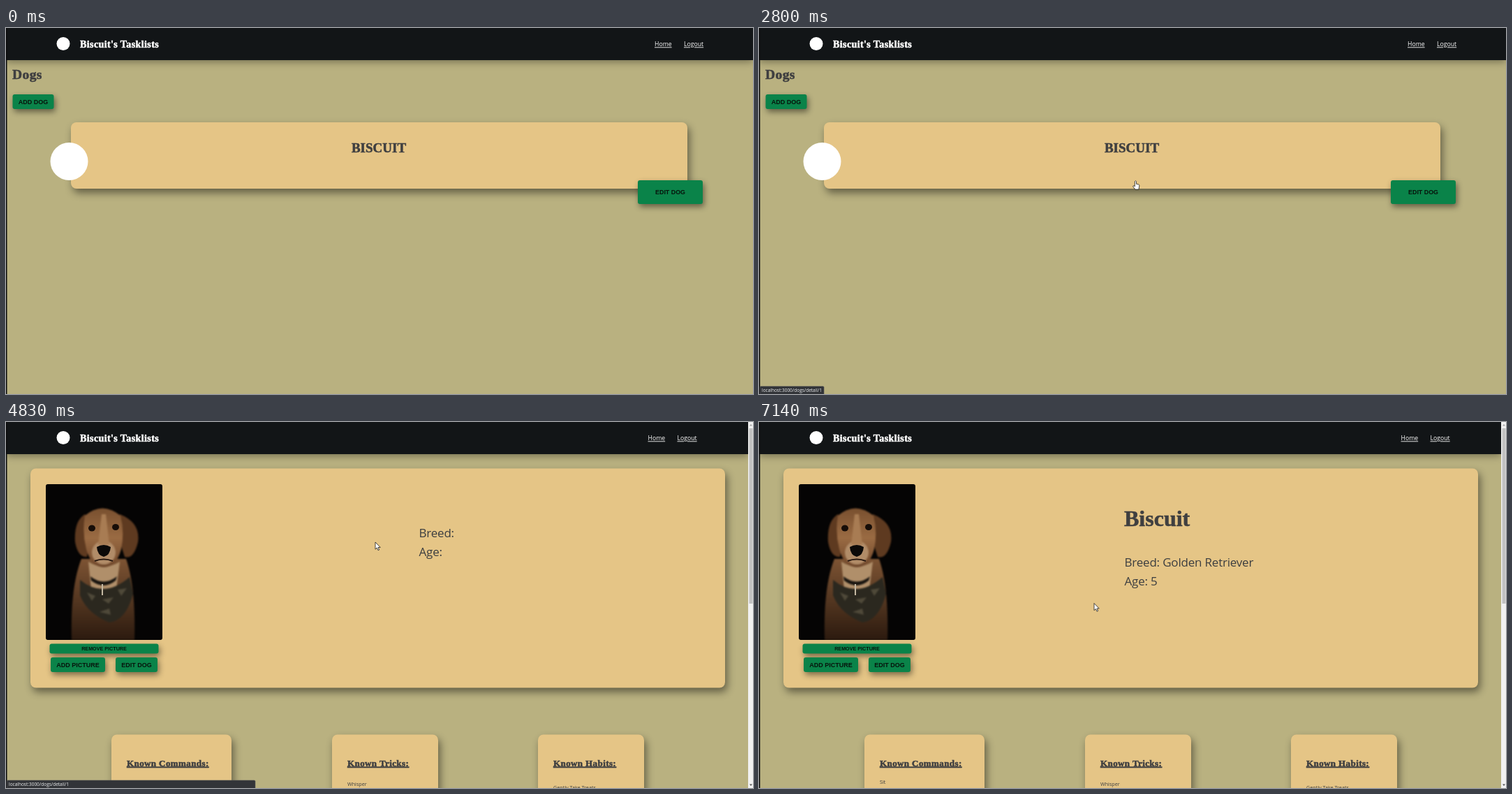
Write an HTML page that moves like this. It is 1070x524 px and loops after 8000 ms.

```html
<!DOCTYPE html>
<html lang="en">
<head>
<meta charset="utf-8">
<title>Dog checklist</title>
<style>
  html, body { margin: 0; width: 100%; height: 100%; overflow: hidden; background: #b9b180; }
  svg { display: block; width: 100vw; height: 100vh; }
  text { font-family: "Open Sans", "Noto Sans", sans-serif; fill: #3c3e40; white-space: pre; }
  .slab { font-family: "Liberation Serif", serif; font-weight: bold; fill: #3f3f40; stroke: #3f3f40; stroke-width: .55px; }
  .brand { fill: #fff; stroke: #fff; font-size: 14px; letter-spacing: .4px; }
  .page { font-size: 19.5px; letter-spacing: .4px; }
  .sub { font-size: 13px; letter-spacing: .4px; text-decoration: underline; }
  .nav { font-size: 8.7px; fill: #fff; text-decoration: underline; }
  .fact { font-size: 17px; letter-spacing: -.2px; }
  .item { font-size: 7.2px; }
  .label { font-family: "Liberation Sans", sans-serif; font-weight: bold; fill: #07140c; text-anchor: middle; }
  .card { fill: #e5c586; filter: drop-shadow(3px 6px 6px #0007); }
  .button { fill: #0a8349; filter: drop-shadow(2px 4px 4.5px #0007); }
  .bar { fill: #121517; filter: drop-shadow(0 2px 6px #0006); }
  .cursor { fill: #fff; stroke: #111; stroke-width: .75px; stroke-linejoin: round; }
  .soft { filter: blur(1.3px); }
</style>
</head>
<body>
<svg viewBox="0 0 1070 524" preserveAspectRatio="none">
  <defs>
    <clipPath id="frame"><rect x="57" y="89" width="167" height="223" rx="3"/></clipPath>
    <linearGradient id="fur" x1="0" y1="0" x2="0" y2="1">
      <stop offset="0" stop-color="#79502f"/><stop offset=".5" stop-color="#9a6b43"/><stop offset="1" stop-color="#6f472b"/>
    </linearGradient>
    <linearGradient id="chest" x1="0" y1="0" x2="0" y2="1">
      <stop offset="0" stop-color="#7d5433"/><stop offset="1" stop-color="#2c1a0f"/>
    </linearGradient>
  </defs>
  <rect width="1070" height="524" fill="#b9b180"/>
  <g id="list"></g>
  <g id="detail"></g>
  <rect width="1.5" height="524" fill="#0b0c0d"/>
  <g id="status">
    <rect id="statusBox" x="1" y="513" height="13" rx="1.5" fill="#323438" stroke="#55565a" stroke-width=".6"/>
    <text x="4" y="521.3" font-size="6.5" style="fill:#eceef0">localhost:3000/dogs/detail/1</text>
  </g>
  <circle id="click" cx="528" cy="174" r="6.2" fill="#e6da00" opacity=".75"/>
  <g id="pointer" class="cursor">
    <path id="arrow" d="M0 0V10.2L2.3 8.1 4 11.7 5.6 11 4 7.5H7.2Z"/>
    <path id="hand" d="M-1.1 1.2Q0-.7 1.1 1.2V4.8L4.4 5.5Q5.5 5.9 5.4 7.4L4.5 12.6H-.6L-3.7 8.6Q-3.6 6.9-2.3 7.3L-1.1 8.4Z"/>
  </g>
</svg>
<script>
const $ = id => document.getElementById(id);
const NAME = "Biscuit";

const text = (cls, x, y, s, extra = "") => `<text class="${cls}" x="${x}" y="${y}" ${extra}>${s}</text>`;
const box = (cls, x, y, w, h, r) => `<rect class="${cls}" x="${x}" y="${y}" width="${w}" height="${h}" rx="${r}"/>`;
const button = (x, y, w, h, s, size = 9) =>
  box("button", x, y, w, h, 3) + text("label", x + w / 2, y + h / 2 + size * .34, s, `font-size="${size}"`);
const header = (width, shift) =>
  box("bar", 0, 0, width, 46, 0) +
  `<circle cx="82" cy="22.5" r="9.5" fill="#fff"/>` +
  text("slab brand", 106, 27.5, NAME + "'s Tasklists") +
  text("nav", 929 - shift, 26.4, "Home") + text("nav", 971 - shift, 26.4, "Logout");
const column = (x, w, title, item, y) =>
  box("card", x, 447.5, w, 100, 8) + text("slab sub", x + 22, 492.7, title) + text("item", x + 22, y, item);

const photo = `<g clip-path="url(#frame)">
  <rect x="57" y="89" width="167" height="223" fill="#050404"/>
  <g class="soft">
    <path d="M108 196Q92 236 94 312H184Q186 236 172 196Z" fill="url(#chest)"/>
    <path d="M118 200Q140 214 163 200L158 240H122Z" fill="#b08f6a"/>
    <path d="M121 221Q140 236 159 221L157 227Q140 241 122 227Z" fill="#191510"/>
    <path d="M106 226Q140 254 177 222L182 246Q172 284 148 287Q116 274 106 248Z" fill="#2b281f"/>
    <path d="M116 244l12 5-5 7zM138 254l16-3-7 9zM160 240l13-2-8 11zM134 272l14-5 2 9z" fill="#4f4939"/>
    <path d="M113 132Q97 142 99 172Q103 194 116 193L124 150ZM163 132Q193 144 189 172Q183 197 170 193L156 150Z" fill="#5e3a20"/>
    <path d="M113 134Q138 113 164 134Q170 158 165 182Q158 208 140 208Q122 208 115 182Q109 158 113 134Z" fill="url(#fur)"/>
    <ellipse cx="140" cy="187" rx="17" ry="17" fill="#b18c68"/>
    <path d="M137 132h6l5 44h-16z" fill="#a87c53"/>
  </g>
  <path d="M130 179Q140 173 150 179Q149 191 140 193Q131 191 130 179Z" fill="#0b0908"/>
  <path d="M127 199Q140 194 153 199" fill="none" stroke="#2a1a12" stroke-width="2"/>
  <ellipse cx="123" cy="152" rx="5" ry="4.5" fill="#160d08"/><ellipse cx="157" cy="150.5" rx="5" ry="4.5" fill="#160d08"/>
  <path d="M138 232v16" stroke="#c4b8a2" stroke-width="2"/>
</g>`;

$("list").innerHTML = header(1070, 0) +
  text("slab page", 9, 73, "Dogs") +
  button(9.5, 95, 59, 21, "ADD DOG") +
  box("card", 93, 135, 883, 95, 8) +
  `<circle cx="90.5" cy="191" r="27" fill="#fff"/>` +
  text("slab", 534, 177.5, NAME.toUpperCase(), 'font-size="19" text-anchor="middle"') +
  button(905, 218, 93, 34, "EDIT DOG", 8.9);

$("detail").innerHTML = header(1063, 9.5) +
  box("card", 35, 66.5, 995, 314, 8) + photo +
  button(62.5, 317.5, 156, 14, "REMOVE PICTURE", 7.2) +
  button(64, 337, 78, 21, "ADD PICTURE") + button(157, 337, 60, 21, "EDIT DOG") +
  `<g id="empty">${text("fact", 591.5, 165, "Breed:")}${text("fact", 591.5, 192, "Age:")}</g>
  <g id="loaded">${text("slab", 523, 148.5, NAME, 'font-size="32"')}
    ${text("fact", 523.5, 207, "Breed: Golden Retriever")}${text("fact", 523.5, 234, "Age: 5")}</g>` +
  column(151, 172, "Known Commands:", "Sit", 518.3) +
  column(467, 152, "Known Tricks:", "Whisper", 521.2) +
  column(762, 152, "Known Habits:", "Gently Take Treats", 525.5) +
  `<rect x="1063" width="7" height="524" fill="#f1f1f1"/>
  <rect x="1064.5" y="9" width="5" height="251" fill="#c1c1c1"/>
  <path d="M1065 5.5l2-2.5 2 2.5z" fill="#a0a0a0"/><path d="M1065 518.5l2 2.5 2-2.5z" fill="#505050"/>`;

// Pointer moves: start, end, steps, target x, y and an optional bend point
const moves = [
  [430, 1200, 12, 553, 230, 760, 245],
  [1270, 1270, 1, 541, 231],
  [1930, 2270, 5, 541, 229.5],
  [2730, 2970, 4, 531, 159],
  [3050, 3290, 4, 529, 166],
  [3820, 4100, 5, 530, 170],
  [4300, 4370, 2, 530, 172],
  [4830, 4830, 1, 529, 172],
  [6300, 6650, 6, 457.5, 232, 478, 190],
  [6720, 7070, 6, 478, 259, 457, 252],
  [7140, 7140, 1, 480, 259.5],
];

function pointerAt(t) {
  let x = 1072, y = 522;
  for (const [start, end, steps, tx, ty, bx = (x + tx) / 2, by = (y + ty) / 2] of moves) {
    if (t < start) break;
    const gap = (end - start) / (steps - 1) || 1;
    const p = Math.min(1, (Math.floor((t - start) / gap) + 1) / steps);
    const e = p * p * (3 - 2 * p);
    const bend = (a, b, c) => (1 - e) ** 2 * a + 2 * e * (1 - e) * b + e * e * c;
    [x, y] = [bend(x, bx, tx), bend(y, by, ty)];
  }
  return [x, y];
}

const show = (id, on) => $(id).style.display = on ? "" : "none";

function draw(now) {
  const t = now % 8000;
  const opened = t >= 4830, loaded = t >= 5160, hover = t >= 2730 && !opened;
  show("list", !opened);
  show("detail", opened);
  show("empty", !loaded);
  show("loaded", loaded);
  show("click", t >= 4700 && !opened);
  show("hand", hover);
  show("arrow", !hover);
  show("pointer", t >= 430);
  show("status", t >= 2730 && t < 5360);
  $("status").setAttribute("opacity", loaded ? Math.max(0, 1 - (Math.floor((t - 5160) / 67) + 1) / 4) : 1);
  $("statusBox").setAttribute("width", opened ? 356 : 92);
  $("pointer").setAttribute("transform", `translate(${pointerAt(t)})`);
  requestAnimationFrame(draw);
}
requestAnimationFrame(draw);
</script>
</body>
</html>
```
